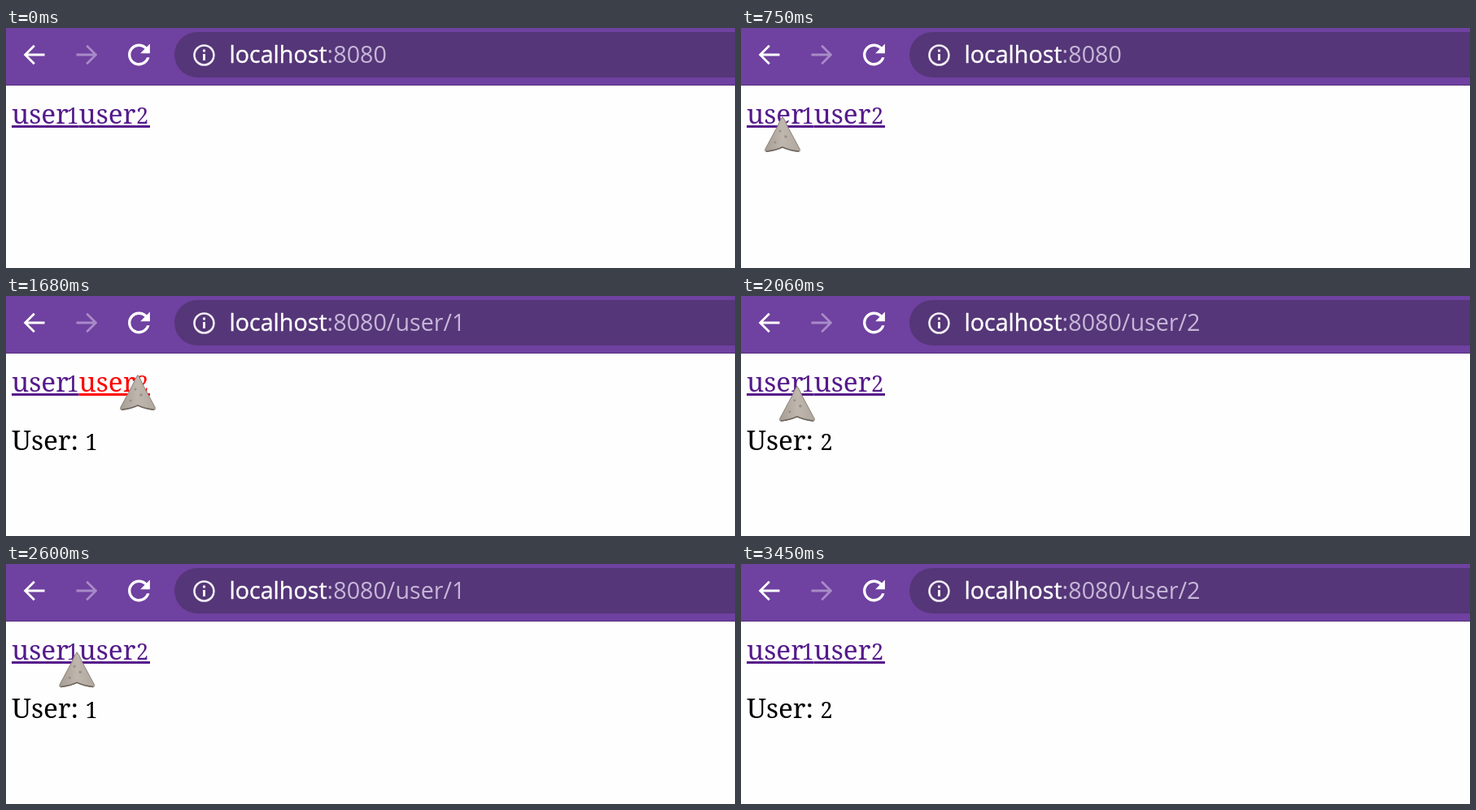
Recreate the animation shown at these times as an HTML page. Size 896 by 296 pixels, loop 3.92 s.

```html
<!DOCTYPE html>
<html lang="en">
<head>
<meta charset="utf-8">
<title>User routes</title>
<style>
  html, body { margin: 0; width: 100%; height: 100%; overflow: hidden; background: #fefefe; }
  svg { display: block; width: 896px; height: 296px; }
  .address { font: 28.7px "Open Sans", "Noto Sans", sans-serif; fill: #c6b6d8; }
  .host { fill: #fff; stroke: #fff; stroke-width: .4; }
  .page { font: 33.4px "Noto Serif", serif; }
  .digit { font-size: 27px; text-anchor: middle; }
  .link { fill: #551a8b; }
  .link.active { fill: #f00; }
</style>
</head>
<body>
<svg viewBox="0 0 896 296">
  <defs>
    <path id="arrow" d="M47.5 33H24M34.8 21.8L23.6 33 34.8 44.2" fill="none" stroke-width="2.8"/>
    <linearGradient id="stone">
      <stop offset="0" stop-color="#a69e95"/>
      <stop offset=".5" stop-color="#bfb7ae"/>
      <stop offset="1" stop-color="#b0a89f"/>
    </linearGradient>
  </defs>

  <rect width="896" height="296" fill="#fefefe"/>
  <rect width="896" height="71" fill="#6f41a0"/>
  <rect y="70" width="896" height="1" fill="#573181"/>
  <rect x="207" y="5" width="760" height="56" rx="28" fill="#553678"/>

  <use href="#arrow" stroke="#fff"/>
  <use href="#arrow" transform="translate(134) scale(-1 1)" stroke="#a88ac8"/>
  <path transform="translate(143.3 12.8) scale(1.68)" fill="#fff"
    d="M17.65 6.35C16.2 4.9 14.21 4 12 4c-4.42 0-8 3.58-8 8s3.58 8 8 8c3.73 0 6.84-2.55 7.73-6h-2.08c-.82 2.33-3.04 4-5.65 4-3.31 0-6-2.69-6-6s2.69-6 6-6c1.66 0 3.14.69 4.22 1.78L13 11h7V4z"/>
  <g fill="#f1edf6">
    <circle cx="243.5" cy="33.5" r="12" fill="none" stroke="#f1edf6" stroke-width="2.6"/>
    <rect x="242" y="26.5" width="3" height="3"/>
    <rect x="242" y="32" width="3" height="8"/>
  </g>

  <text class="address" x="274.4" y="43"><tspan class="host">localhost</tspan>:8080<tspan id="route"></tspan></text>

  <g class="page">
    <g class="link" id="link1">
      <text x="7" y="118">user</text>
      <text class="digit" x="82" y="118">1</text>
      <rect x="7" y="120" width="82.5" height="3"/>
    </g>
    <g class="link" id="link2">
      <text x="89.5" y="118">user</text>
      <text class="digit" x="167.5" y="118">2</text>
      <rect x="89.5" y="120" width="87.5" height="3"/>
    </g>
    <g id="result">
      <text x="7" y="190">User:</text>
      <text class="digit" id="number" x="105" y="190"></text>
    </g>
  </g>

  <g id="cursor">
    <path d="M0 .5Q3 4 6 12L21 40Q22.5 43.6 19 43.5Q8 42 0 38Q-8 42-19 43.5Q-22.5 43.6-21 40L-6 12Q-3 4 0 .5z"
      fill="url(#stone)" stroke="#8a8178"/>
    <path d="M-20 43.2Q-8 42 0 38Q8 42 20 43.2" fill="none" stroke="#70675f" stroke-width="1.6"/>
    <g fill="#999188">
      <circle cx="-3" cy="18" r="1.5"/>
      <circle cx="4" cy="25" r="1.8"/>
      <circle cx="-9" cy="32" r="1.6"/>
    </g>
  </g>
</svg>
<script>
const LOOP = 3920;
const STEP = 73; // the pointer moves in steps, not smoothly
const $ = id => document.getElementById(id);

const easeIn = power => p => p ** power;
const easeOut = power => p => 1 - (1 - p) ** power;
const mix = (a, b, p) => a + (b - a) * p;

const entry = { x: 480, y: 377 };
const glides = [
  { start: 70, steps: 9, x: 51, y: 109, easeX: easeOut(2), easeY: easeOut(4) },
  { start: 1070, steps: 1, x: 51, y: 105, easeX: easeIn(1), easeY: easeIn(1) },
  { start: 1220, steps: 4, x: 162, y: 97, easeX: easeOut(1.5), easeY: easeIn(3) },
  { start: 1910, steps: 6, x: 52, y: 111, easeX: easeOut(2.7), easeY: easeOut(6) },
  { start: 2520, steps: 6, x: 140, y: 108, easeX: easeOut(1.26), easeY: easeOut(6) },
  { start: 3220, steps: 4, x: 995, y: 384, easeX: easeIn(1.6), easeY: easeIn(1.6) }
];

const clicks = [
  { press: 840, release: 900, user: 1 },
  { press: 1680, release: 1760, user: 2 },
  { press: 2370, release: 2450, user: 1 },
  { press: 3060, release: 3140, user: 2 }
];

function pointerAt(t) {
  let { x, y } = entry;
  for (const g of glides.filter(g => g.start <= t)) {
    const p = Math.min(1, (Math.floor((t - g.start) / STEP) + 1) / g.steps);
    x = mix(x, g.x, g.easeX(p));
    y = mix(y, g.y, g.easeY(p));
  }
  return { x, y };
}

function draw(t) {
  const { x, y } = pointerAt(t);
  $('cursor').setAttribute('transform', `translate(${x} ${y})`);

  const pressed = clicks.find(c => t >= c.press && t < c.release)?.user;
  for (const n of [1, 2]) $('link' + n).classList.toggle('active', pressed === n);

  const user = clicks.findLast(c => c.release <= t)?.user;
  $('route').textContent = user ? '/user/' + user : '';
  $('result').style.display = user ? '' : 'none';
  $('number').textContent = user ?? '';
}

const start = performance.now();
function tick() {
  draw((performance.now() - start) % LOOP);
  requestAnimationFrame(tick);
}
tick();
</script>
</body>
</html>
```
